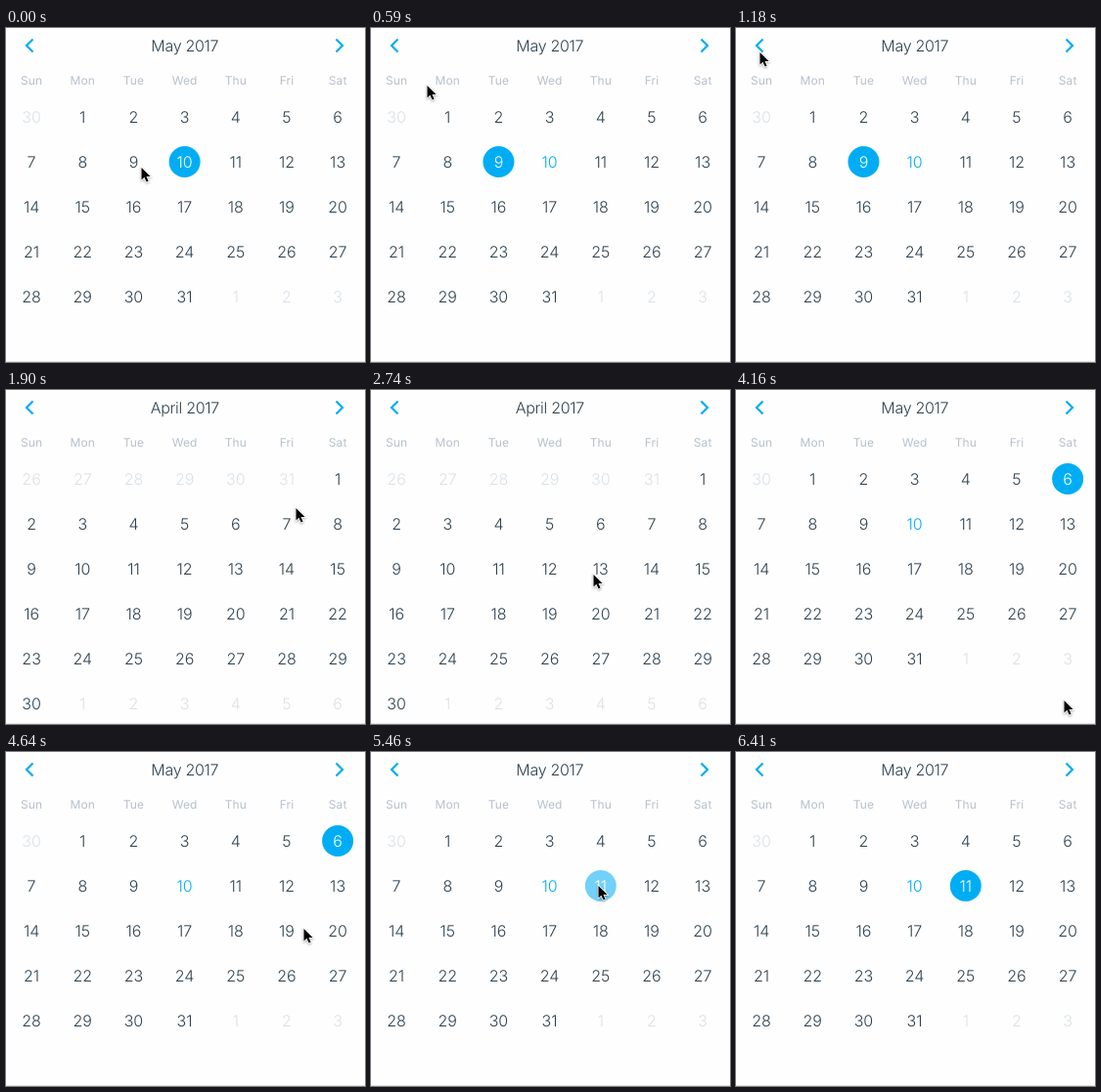
An HTML page that plays this animation: 367x342 px, repeating every 6.76 s.

```html
<!DOCTYPE html>
<html lang="en">
<head>
<meta charset="utf-8">
<title>Calendar</title>
<style>
html, body { margin: 0; width: 100%; height: 100%; overflow: hidden; background: #fefefe; }
svg { display: block; font: 300 16px Inter, "Open Sans", sans-serif; text-anchor: middle; fill: #2d4150; text-rendering: geometricPrecision; }
.title { letter-spacing: -.3px; }
.week { font-size: 12px; font-weight: 400; fill: #b6c1cd; letter-spacing: .1px; }
.off { fill: #d9e1e8; }
.today { fill: #00adf5; }
.on { fill: #fff; }
.chevron { fill: none; stroke: #00adf5; stroke-width: 2.2; }
.pointer { fill: #000; stroke: #fff; stroke-width: 1.6; paint-order: stroke; filter: drop-shadow(0 1px 1px #0005); }
</style>
</head>
<body>
<svg id="stage" width="367" height="342" viewBox="0 0 367 342"></svg>
<script>
const LOOP = 6760, STEP = 118.75, END = 54, APRIL = 3, MAY = 4;
const stage = document.getElementById('stage');
const weekdays = ['Sun', 'Mon', 'Tue', 'Wed', 'Thu', 'Fri', 'Sat'];

// Each tap shows a month and selects a day; some days fade in.
const taps = [
  { at: 0, month: MAY, day: 10 },
  { at: 2, month: MAY, day: 9, fades: true },
  { at: 10, month: APRIL },
  { at: 25, month: APRIL, day: 13, fades: true },
  { at: 35, month: MAY, day: 6 },
  { at: 46, month: MAY, day: 11, fades: true }
];

// Pointer stops: [arrives, leaves, x, y], with straight moves between them
const stops = [
  [0, 3, 139, 142], [5, 5, 58, 58], [6, 6, 9, 33], [8, 12, 25, 24],
  [16, 16, 297, 120], [18, 18, 250, 140], [20, 26, 228, 188],
  [29, 29, 354, 311], [33, 36, 336, 317], [39, 39, 305, 180],
  [44, 48, 233, 136], [52, END, 341, 334]
];

const colX = i => 26.1 + 52.17 * i;
const mix = (a, b, u) => a + (b - a) * u;
const text = (x, y, s, cls = '') => `<text x="${x}" y="${y}" class="${cls}">${s}</text>`;
const chevron = (tip, dir) => `<path class="chevron" d="M${tip + 6.5 * dir} 11.5L${tip} 18l${6.5 * dir} 6.5"/>`;

function pointer(step) {
  if (step >= END) return '';
  const i = stops.findLastIndex(s => s[0] <= step);
  const [, leaves, x0, y0] = stops[i];
  const [arrives, , x1, y1] = stops[i + 1] || stops[i];
  const u = step > leaves ? (step - leaves) / (arrives - leaves) : 0;
  return `<path class="pointer" transform="translate(${mix(x0, x1, u)} ${mix(y0, y1, u)})"
    d="M-.5 1V13.4L2.4 10.7 4.6 15.6 6.6 14.7 4.5 10H8.6Z"/>`;
}

function days(month, selected, alpha) {
  const first = new Date(2017, month, 1).getDay();
  const count = new Date(2017, month + 1, 0).getDate();
  let out = '';
  for (let i = 0; i < Math.ceil((first + count) / 7) * 7; i++) {
    const date = new Date(2017, month, 1 - first + i), day = date.getDate();
    const x = colX(i % 7), y = 91 + 46 * Math.floor(i / 7);
    const inMonth = date.getMonth() === month;
    if (inMonth && day === selected) {
      out += `<g opacity="${alpha}"><circle cx="${x}" cy="${y}" r="16" fill="#00adf5"/>${text(x, y + 6, day, 'on')}</g>`;
    } else {
      out += text(x, y + 6, day, !inMonth ? 'off' : month === MAY && day === 10 ? 'today' : '');
    }
  }
  return out;
}

function draw(step) {
  const { at, month, day, fades } = taps.findLast(t => t.at <= step);
  stage.innerHTML =
    text(182.8, 24, (month === MAY ? 'May' : 'April') + ' 2017', 'title') +
    chevron(21, 1) + chevron(344, -1) +
    weekdays.map((d, i) => text(colX(i), 58, d, 'week')).join('') +
    days(month, day, fades && step === at ? .55 : 1) +
    '<path d="M0 341.5H367" stroke="#e2e4e6"/>' +
    pointer(step);
}

// The picture advances in even steps, then rests on the last one.
let shown = -1;
function tick() {
  const t = performance.now() % LOOP;
  const step = Math.min(END, Math.floor((t + 5) / STEP));
  if (step !== shown) draw(shown = step);
  requestAnimationFrame(tick);
}
tick();
</script>
</body>
</html>
```
